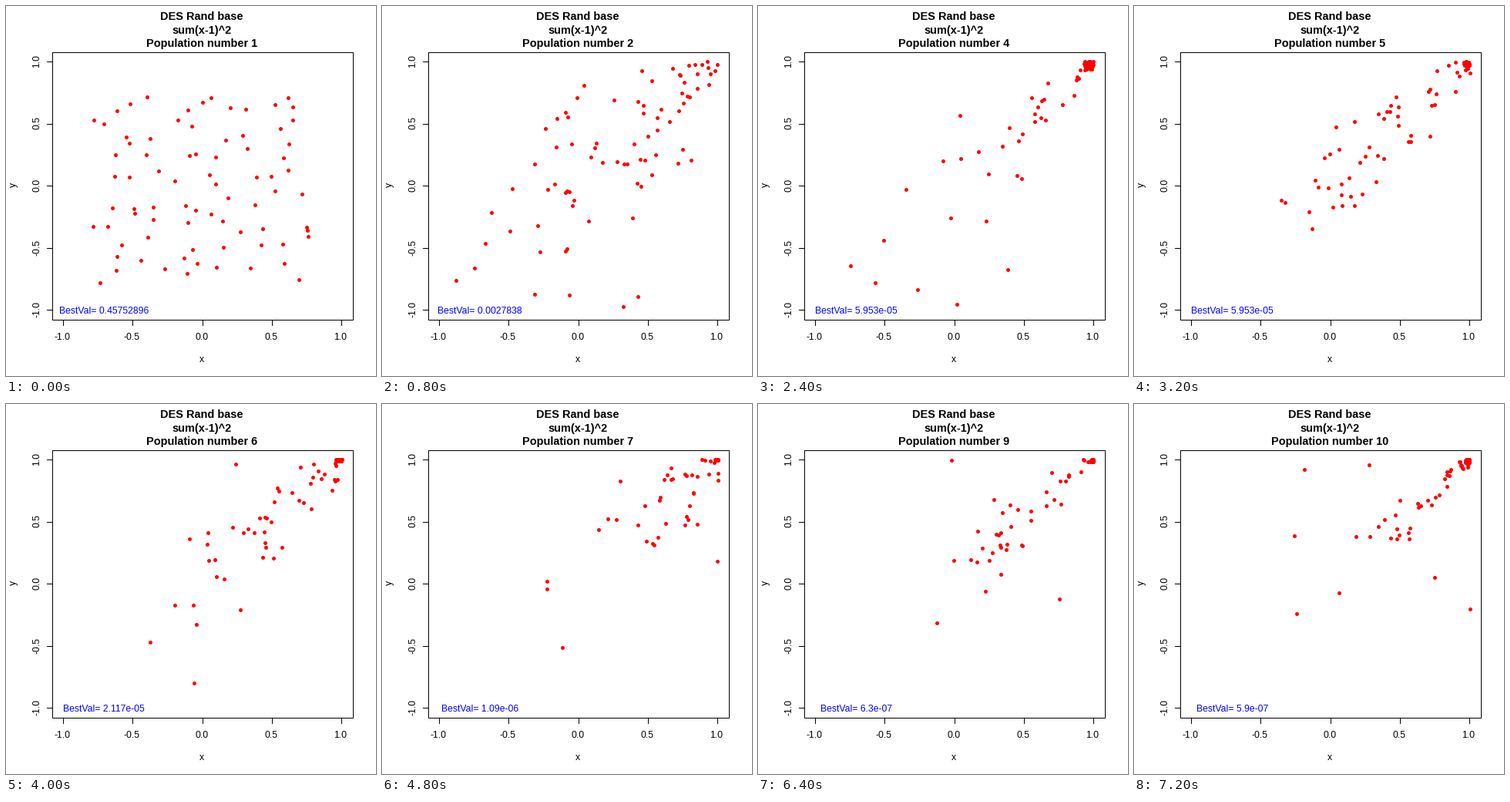
Animation of 480 by 480 pixels, one loop 8000 ms. Source, as a matplotlib script:

```python
import numpy as np
import matplotlib.pyplot as plt
from matplotlib.animation import FuncAnimation

SIZE, DPI = 480, 100
CX, CY, UX, UY = 254, 232, 181, 161  # plot origin and pixels per unit
plt.rcParams["font.family"] = "Liberation Sans"


def to_stage(xy):
    return np.column_stack([CX + UX * xy[:, 0], CY - UY * xy[:, 1]])


def scatter(seed, *outliers):
    """First population: one jittered point per cell of a square grid."""
    rng = np.random.default_rng(seed)
    cells = np.array(list(np.ndindex(9, 8))) + rng.uniform(0, 1, (72, 2))
    xy = cells / (9, 8) * (1.56, 1.5) - 0.78
    return np.vstack([to_stage(xy), outliers])


def swarm(seed, n, reach, power, spread, *outliers, tight=0, radius=0.02,
          bounce=False):
    """A trail along the diagonal that ends in a tight group at (1, 1)."""
    rng = np.random.default_rng(seed)
    back = reach * rng.uniform(0, 1, (n, 1)) ** power
    xy = 1 - back + rng.normal(0, spread, (n, 2)) * np.sqrt(back)
    xy = 1 - abs(1 - xy) if bounce else np.minimum(xy, 1)
    group = 1 - rng.uniform(0, radius, (tight, 2))
    xy = np.maximum(np.vstack([xy, group]), -0.95)
    return np.vstack([to_stage(xy), *outliers])


populations = [
    scatter(4, (113, 147), (121, 358), (365, 118), (265, 118), (390, 290),
            (112, 285)),
    swarm(2, 72, 1.4, 1.2, 0.3, (95, 355), (133, 307), (141, 267),
          (197, 373), (312, 389), (331, 376), (211, 158), (261, 102),
          bounce=True),
    swarm(11, 65, 1.6, 1.5, 0.25, tight=15, radius=0.15, bounce=True),
    swarm(3, 31, 1.1, 1.2, 0.18, (119, 336), (151, 358), (162, 303),
          (206, 367), (257, 386), (323, 341), (239, 200),
          tight=42, radius=0.07, bounce=True),
    swarm(23, 55, 1.3, 1.3, 0.18, tight=25, radius=0.04),
    swarm(5, 49, 0.95, 1.2, 0.22, (186, 308), (243, 361), (297, 77),
          (246, 285), (303, 266), tight=20),
    swarm(7, 38, 0.62, 1.1, 0.27, (213, 229), (213, 239), (233, 315),
          (308, 99), (434, 203), tight=20, radius=0.01),
    swarm(31, 45, 0.85, 1.3, 0.16, (330, 303), tight=25),
    swarm(9, 38, 0.8, 1.2, 0.12, (250, 72), (231, 283), (390, 252),
          (305, 123), (253, 202), (294, 242), tight=30),
    swarm(10, 37, 0.65, 1.4, 0.14, (220, 84), (304, 78), (207, 170),
          (210, 271), (435, 265), (389, 224), (265, 244),
          tight=30, radius=0.03),
]
best = ["0.45752896", "0.0027838", "0.00039412", "5.953e-05", "5.953e-05",
        "2.117e-05", "1.09e-06", "6.3e-07", "6.3e-07", "5.9e-07"]

fig = plt.figure(figsize=(SIZE / DPI, SIZE / DPI), dpi=DPI, facecolor="white")
ax = fig.add_axes([0, 0, 1, 1])
ax.set(xlim=(0, SIZE), ylim=(SIZE, 0))
ax.axis("off")


def label(x, y, text, px=12.2, **style):
    return ax.text(x, y, text, size=px * 72 / DPI, ha="center", va="baseline",
                   rotation_mode="anchor", **style)


def line(xs, ys):
    ax.plot(np.add(xs, 0.5), np.add(ys, 0.5), color="black", lw=72 / DPI,
            solid_capstyle="projecting", solid_joinstyle="miter")


line([59, 449, 449, 59, 59], [59, 59, 406, 406, 59])
for v in np.linspace(-1, 1, 5):
    x, y = int(CX + 180.9 * v), round(CY + 0.1 - UY * v)
    line([x, x], [406, 413])
    line([52, 59], [y, y])
    label(x, 433, f"{v:.1f}")
    label(43, y, f"{v:.1f}", rotation=90)
label(254, 462, "x")
label(13, 232, "y", rotation=90)

label(254, 18, "DES Rand base", 14.5, weight="bold")
label(254, 36, "sum(x-1)^2", 14.5, weight="bold")
title = label(254, 53, "", 14.5, weight="bold")
dots, = ax.plot([], [], "o", color="red", ms=5 * 72 / DPI, mew=0)
value = label(127.3, 399, "", 12.3, color="blue")


def draw(i):
    title.set_text(f"Population number {i + 1}")
    value.set_text(f"BestVal= {best[i]}")
    dots.set_data(*(np.floor(populations[i]) + 0.5).T)
    return title, value, dots


anim = FuncAnimation(fig, draw, frames=len(populations), interval=800,
                     repeat=True, repeat_delay=0)
plt.show()
```
